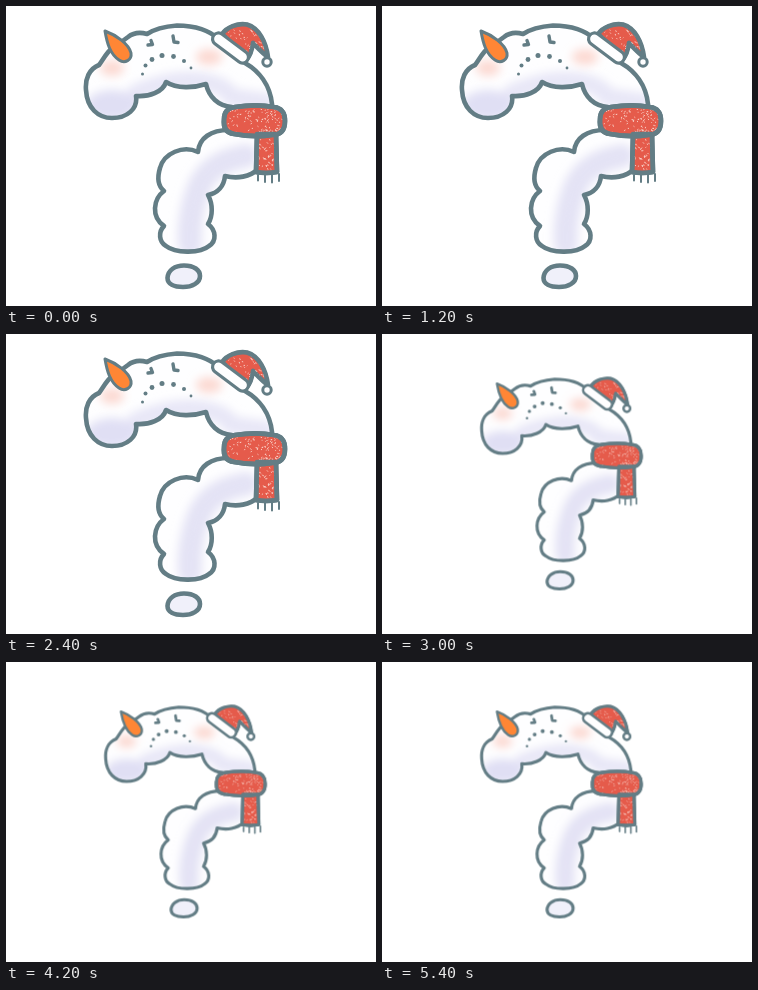
An HTML page that plays this animation: 370x300 px, repeating every 6000 ms.

```html
<!DOCTYPE html>
<html lang="en">
<head>
<meta charset="utf-8">
<title>Snowman question mark</title>
<style>
  html, body { margin: 0; width: 100%; height: 100%; overflow: hidden; background: #fff; }
  svg { display: block; width: 370px; height: 300px; }
  #snowman {
    transform-origin: 179.5px 149.5px;
    animation: pulse 1200ms step-end infinite;
    stroke: #637d85;
    stroke-linejoin: round;
    stroke-linecap: round;
  }
  @keyframes pulse {
    0% { transform: none; stroke-width: 4.6px; }
    50% { transform: scale(.802); stroke-width: 3.9px; }
  }
  .snow { fill: #fefeff; }
  .red { fill: #e55b4b; }
  .line { fill: none; }
  .soft { filter: url(#blur); }
  .shade { fill: #e0dff4; stroke: none; }
  .band { fill: none; stroke: #e0dff4; }
  .blush { fill: #fcd9d2; stroke: none; }
  .face { fill: #637d85; stroke: none; }
  .specks { fill: none; stroke: #fad6cd; stroke-width: .9px; }
</style>
</head>
<body>
<svg viewBox="0 0 370 300">
  <defs>
    <filter id="blur" filterUnits="userSpaceOnUse" x="60" y="0" width="240" height="300"><feGaussianBlur stdDeviation="5"/></filter>
    <path id="head" d="M103 45C98 51 96 55 93 59C83 63 79 73 80 84C81 102 92 112 106 112C121 112 132 103 130 90C143 91 157 86 160 76C171 83 188 82 200 78C203 91 212 100 226 101L226 110H266V98C264 79 253 65 239 57L211 32C204 25 190 19.5 171 19.5C159 20.5 147 24 141 28C134 26 127 27 122 31Z"/>
    <path id="torso" d="M223 124C205 124 193 132 192 146C177 139 158 147 154 162C151 172 152 180 158 185C147 193 145 211 158 220C152 226 153 236 160 240C170 248 195 247 203 240C211 235 210 224 202 218C207 210 207 198 202 189C212 187 218 180 219 170C231 173 244 171 252 163V124Z"/>
    <path id="hat" d="M216 28C221 21 231 17 241 18.5C253 22 260 36 262 51C256 47 251 41 247 37C246 44 245 49 241 53Z"/>
    <path id="scarf" d="M229 101C242 99 257 99 268 101C276 102 279 108 279 115C279 124 275 129 266 129C253 131 239 130 228 128C220 127 217 122 218 113C218 106 222 102 229 101Z"/>
    <path id="tail" d="M251 128H270L271 166Q260 168 250 166Z"/>
    <clipPath id="headClip"><use href="#head"/></clipPath>
    <clipPath id="torsoClip"><use href="#torso"/></clipPath>
    <clipPath id="redClip"><use href="#hat"/><use href="#scarf"/><use href="#tail"/></clipPath>
  </defs>

  <g id="snowman">
    <use href="#head" class="snow" stroke="none"/>
    <g clip-path="url(#headClip)">
      <g class="soft">
        <ellipse class="shade" cx="106" cy="99" rx="26" ry="15"/>
        <path class="band" d="M130 87Q165 72 192 75T225 91L260 96" stroke-width="18" opacity=".75"/>
      </g>
      <g class="soft blush">
        <ellipse cx="106" cy="62" rx="12" ry="8"/>
        <ellipse cx="203" cy="51" rx="13" ry="8"/>
      </g>
    </g>
    <use href="#head" class="line"/>

    <use href="#torso" class="snow" stroke="none"/>
    <g clip-path="url(#torsoClip)">
      <g class="soft">
        <path class="band" d="M240 150Q202 156 192 184T184 238" stroke-width="24" opacity=".85"/>
      </g>
    </g>
    <use href="#torso" class="line"/>

    <path fill="#f0f0fa" d="M161.5 272C162 264 169 259.5 178 259.5C188 259.5 194 264 194 270C194 277 186 281 177 281C168 281 161.5 278 161.5 272Z"/>

    <path d="M99 25C110 29 123 38 125 47C126 54 119 58 113 54C104 48 101 37 99 25Z" fill="#ff8635" stroke-width="3"/>
    <path class="line" d="M145 34.5L146.5 38.5L142 39M167 30L168 36L172 36.5" stroke-width="3.4"/>
    <g class="face">
      <circle cx="136.5" cy="68" r="1.5"/>
      <circle cx="139.5" cy="59.5" r="2"/>
      <circle cx="146" cy="53.5" r="2.4"/>
      <circle cx="156" cy="49.5" r="2.5"/>
      <circle cx="167.5" cy="50.5" r="2.4"/>
      <circle cx="178" cy="55" r="2"/>
      <circle cx="185" cy="62" r="1.4"/>
    </g>

    <path class="line" d="M252 169V174.5M259 169V176M266 169V176.5M273 168V175" stroke-width="2"/>
    <use href="#tail" class="red"/>
    <use href="#hat" class="red"/>
    <use href="#scarf" class="red"/>
    <g clip-path="url(#redClip)"><path id="specks" class="specks"/></g>
    <g class="line">
      <use href="#tail"/>
      <use href="#hat" stroke-width="3.4"/>
      <use href="#scarf"/>
    </g>
    <rect class="snow" x="203.5" y="36" width="42" height="12" rx="6" transform="rotate(37 224.5 42)" stroke-width="3.2"/>
    <circle class="snow" cx="261" cy="56" r="4.2" stroke-width="3"/>
  </g>
</svg>
<script>
  let seed = 7;
  const random = () => (seed = seed * 16807 % 2147483647) / 2147483647;
  const scatter = (count, x, y, width, height) => {
    let path = '';
    for (let i = 0; i < count; i++) {
      const px = x + random() * width, py = y + random() * height;
      const dx = (random() - .5) * 1.6, dy = (random() - .5) * 1.6;
      path += `M${px.toFixed(1)} ${py.toFixed(1)}l${dx.toFixed(1)} ${dy.toFixed(1)}`;
    }
    return path;
  };
  document.getElementById('specks').setAttribute('d',
    scatter(110, 220, 103, 56, 24) + scatter(45, 252, 132, 17, 33) + scatter(75, 218, 19, 42, 32));
</script>
</body>
</html>
```
